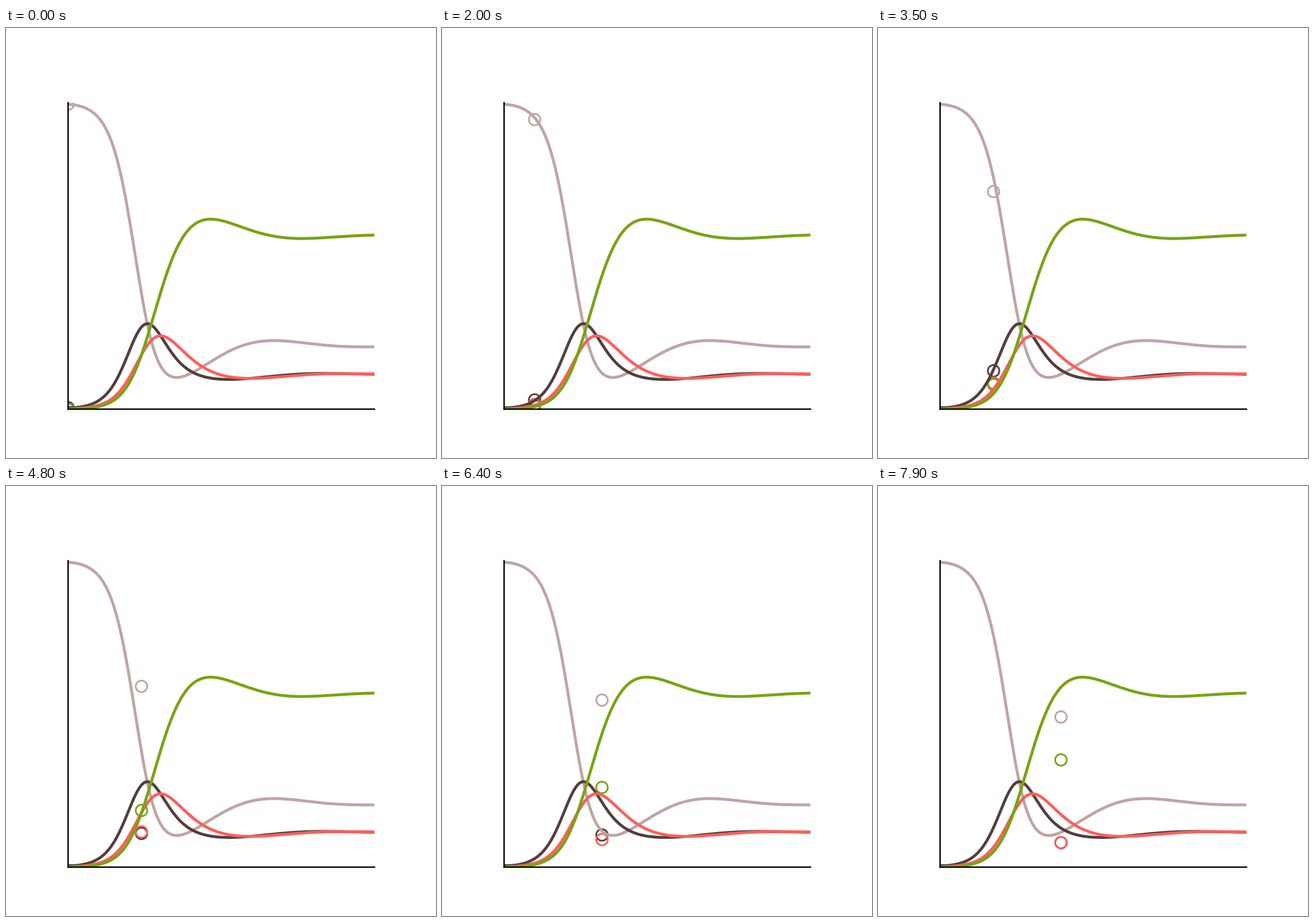
These frames come from a looping animation (748 by 748 pixels, 8 s). A matplotlib script:

```python
import numpy as np
import matplotlib.pyplot as plt
from matplotlib.animation import FuncAnimation

SIZE, DPI = 748, 100
PX = 72 / DPI  # points per pixel
LEFT, BOTTOM, SIDE = 107.75, 85, 533
FRAMES, INTERVAL = 80, 100
PEOPLE, DAYS = 200, 200
COLORS = ["#bea5a3", "#543f3e", "#ff5e5b", "#79a314"]

# Daily rates of the SEIRS model and the share exposed at the start
BETA, SIGMA, GAMMA, DELTA = 0.485, 0.1, 0.1, 0.02
EXPOSED = 1.05

# The random run drifts between a few key days
KEY_DAYS = [0, 20, 35, 48, 56, 64, 79]
SUSCEPTIBLE = [199, 189, 142, 118, 113, 109, 98]
INCUBATING = [1, 6, 25, 22, 21, 21, 16]
INFECTIOUS = [0, 3, 17, 23, 18, 18, 16]


def rates(y):
    s, e, i, r = y
    infect = BETA * s * i / PEOPLE
    return np.array([
        DELTA * r - infect,
        infect - SIGMA * e,
        SIGMA * e - GAMMA * i,
        GAMMA * i - DELTA * r,
    ])


def solve(y):
    """Integrate the model with one RK4 step per day."""
    rows = [y]
    for _ in range(DAYS):
        k1 = rates(y)
        k2 = rates(y + k1 / 2)
        k3 = rates(y + k2 / 2)
        k4 = rates(y + k3)
        y = y + (k1 + 2 * k2 + 2 * k3 + k4) / 6
        rows.append(y)
    return np.array(rows).T


def counts(day):
    """Whole numbers of people in each state; the rest have recovered."""
    sei = [round(np.interp(day, KEY_DAYS, keys))
           for keys in (SUSCEPTIBLE, INCUBATING, INFECTIOUS)]
    return sei + [PEOPLE - sum(sei)]


fig = plt.figure(figsize=(SIZE / DPI, SIZE / DPI), dpi=DPI, facecolor="white")
ax = fig.add_axes([v / SIZE for v in (LEFT, BOTTOM, SIDE, SIDE)])
ax.set(xlim=(0, DAYS), ylim=(0, PEOPLE), xticks=[], yticks=[])
ax.patch.set_visible(False)
ax.spines[["top", "right"]].set_visible(False)
ax.spines[["left", "bottom"]].set_linewidth(2.5 * PX)

start = np.array([PEOPLE - EXPOSED, EXPOSED, 0, 0])
for values, color in zip(solve(start), COLORS):
    ax.plot(np.arange(DAYS + 1), values, color=color, lw=5 * PX,
            solid_capstyle="butt", zorder=2)

rings = [
    ax.scatter([0], [0], s=(20 * PX) ** 2, facecolors="none",
               edgecolors=color, linewidths=3 * PX, zorder=1)
    for color in COLORS
]


def update(day):
    for ring, n in zip(rings, counts(day)):
        ring.set_offsets([(day, n)])
    return rings


anim = FuncAnimation(fig, update, frames=FRAMES, init_func=lambda: update(0),
                     interval=INTERVAL, repeat=True, repeat_delay=0)
plt.show()
```
